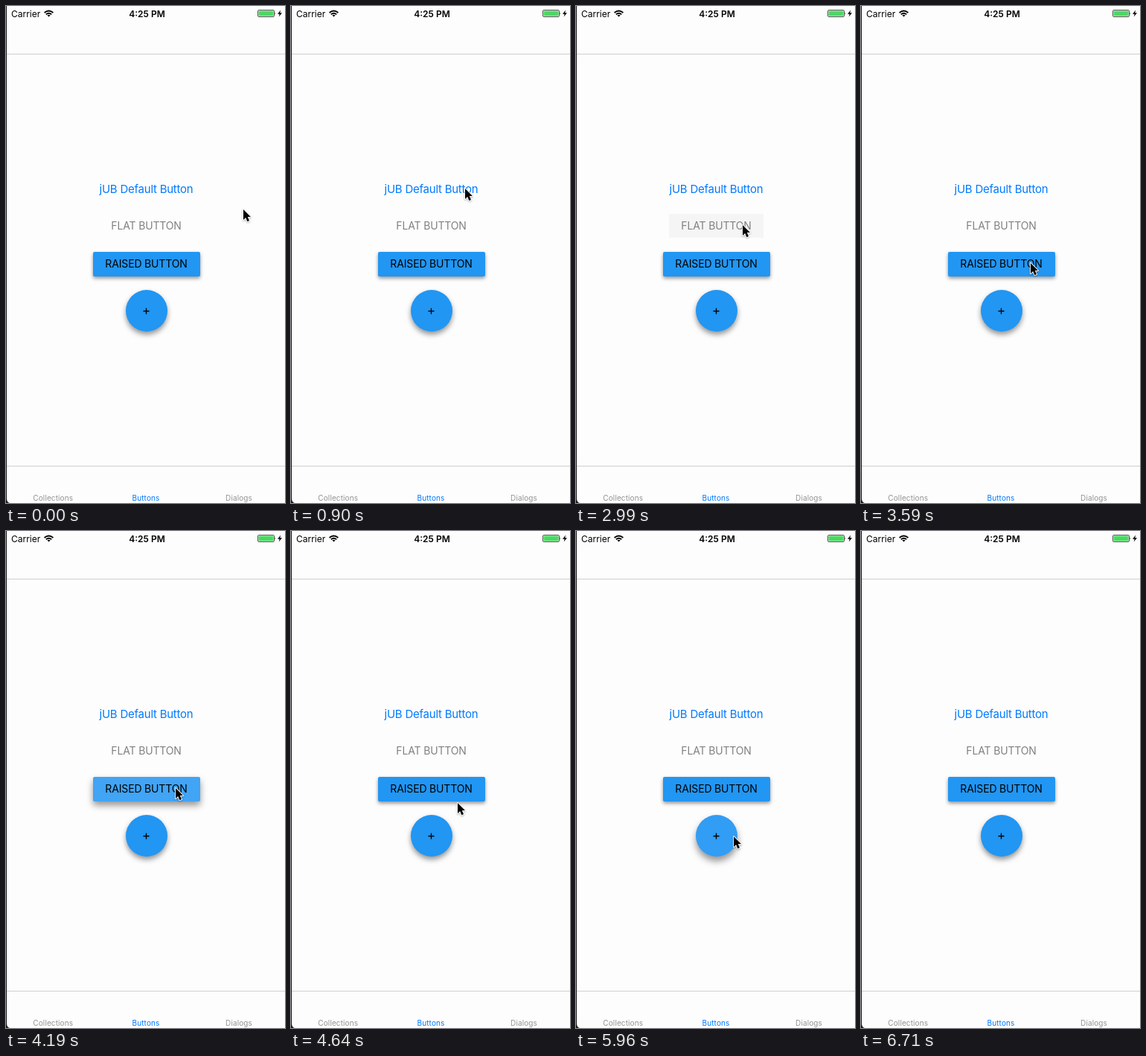
These frames come from a looping animation (375x667 px, 7.22 s). An HTML page:

```html
<!DOCTYPE html>
<html lang="en">
<head>
<meta charset="utf-8">
<title>Buttons</title>
<style>
  html, body { margin: 0; width: 100%; height: 100%; overflow: hidden; background: #fdfdfd; }
  .stage { position: relative; width: 375px; height: 667px; overflow: hidden; background: #fdfdfd; }
  .stage > * { position: absolute; }
  #flat { left: 125px; top: 279px; width: 127px; height: 32px; }
  #raised { left: 116.5px; top: 329.5px; width: 144px; height: 33px; border-radius: 2px; }
  #fab { left: 160.5px; top: 380.5px; width: 56px; height: 56px; border-radius: 50%; }
  svg { left: 0; top: 0; }
  text { font: 14px Inter, "Liberation Sans", sans-serif; text-anchor: middle; }
  .label { letter-spacing: -.16px; }
  .status { font-size: 12px; }
  .tab { font-size: 10px; letter-spacing: .1px; fill: #929292; }
  #plain { font-size: 15px; letter-spacing: -.24px; fill: #007aff; }
</style>
</head>
<body>
<div class="stage">
  <div id="flat"></div>
  <div id="raised"></div>
  <div id="fab"></div>
  <svg width="375" height="667" viewBox="0 0 375 667">
    <path d="M0 64.5H375M0 617.5H375" stroke="#cfcfcf"/>
    <path d="M0 0H1V661Q1 666 5 667H0Z" fill="#1c1c1c"/>

    <text class="status" x="7" y="14.5" style="text-anchor:start">Carrier</text>
    <g fill="none" stroke="#000" stroke-width="1.8">
      <path d="M51.6 9Q57.5 3.9 63.4 9M53.8 11.2Q57.5 8.2 61.2 11.2"/>
      <path d="M57.5 14.6L55.4 12.4Q57.5 10.9 59.6 12.4Z" fill="#000" stroke="none"/>
    </g>
    <text class="status" x="189.5" y="14.5" font-weight="600" style="font-weight:600">4:25 PM</text>
    <rect x="338.5" y="5.5" width="22" height="9" rx="1.5" fill="none" stroke="#555"/>
    <rect x="339.5" y="6.5" width="20" height="7" rx=".6" fill="#4cd964"/>
    <path d="M361.5 8.2Q363.2 10 361.5 11.8Z" fill="#333"/>
    <path d="M369.2 5.5L365 10.7H367.7L366.7 14.5L371 9.2H368.2Z"/>

    <text id="plain" x="188.5" y="251">jUB Default Button</text>
    <text class="label" x="188.5" y="300.2" fill="#808080">FLAT BUTTON</text>
    <text class="label" x="188.5" y="351.2">RAISED BUTTON</text>
    <path d="M184.5 409.5H192.5M188.5 405.5V413.5" stroke="#000" stroke-width="1.3"/>

    <text class="tab" x="63.2" y="663.6">Collections</text>
    <text class="tab" x="188" y="663.6" style="fill:#007aff">Buttons</text>
    <text class="tab" x="313" y="663.6">Dialogs</text>

    <g id="cursor" style="filter:drop-shadow(0 1px 1px rgba(0,0,0,.3))">
      <path d="M0 0V14L3.2 11.1L5.4 16.2L8 15.1L5.8 10.1H10Z" stroke="#fff" stroke-width="1.8" stroke-linejoin="round" paint-order="stroke"/>
    </g>
  </svg>
</div>
<script>
const LOOP = 7220;

// Each step is [ms, style]; a style holds until the next step.
function play(id, steps) {
  const frames = steps.map(([ms, style]) => ({ ...style, offset: ms / LOOP, easing: "steps(1, end)" }));
  frames.push({ ...steps[steps.length - 1][1], offset: 1 });
  document.getElementById(id).animate(frames, { duration: LOOP, iterations: Infinity });
}

const at = (x, y, opacity = 1) => ({ transform: `translate(${x}px, ${y}px)`, opacity });
const alpha = opacity => ({ opacity });
const fill = background => ({ background });
const lifted = (y, blur, backgroundColor = "#2196f3") =>
  ({ backgroundColor, boxShadow: `0 ${y}px ${blur}px rgba(0,0,0,.42)` });
const HALF = "#319df4", LIGHT = "#41a4f5";

play("cursor", [
  [0, at(319, 273)], [150, at(315, 272)],
  [450, at(300, 268)], [600, at(270, 257)], [750, at(244, 247)], [900, at(234, 245)],
  [1500, at(233, 247)], [1650, at(230, 262)], [1800, at(226, 282)], [1940, at(224, 293)], [2090, at(224, 294)],
  [3290, at(224, 303)], [3440, at(227, 330)], [3590, at(228, 345)],
  [4490, at(228, 346)], [4640, at(224, 365)], [4790, at(214, 392)], [4930, at(210, 405)], [5080, at(210, 407)],
  [5960, at(212, 410)], [6110, at(245, 480)], [6260, at(290, 560)], [6410, at(304, 582)], [6560, at(326, 621)],
  [6710, at(326, 621, 0)]
]);

play("plain", [
  [0, alpha(1)], [1050, alpha(.2)], [1500, alpha(.6)], [1650, alpha(.9)], [1800, alpha(1)]
]);

play("flat", [
  [0, fill("transparent")],
  [2690, fill("radial-gradient(circle at 99px 16px, #ececec, #f4f4f4 40px, #f5f5f5 68px, #f9f9f9 69px)")],
  [2990, fill("#f5f5f5")], [3290, fill("#f8f8f8")], [3440, fill("#fbfbfb")], [3590, fill("transparent")]
]);

play("raised", [
  [0, lifted(2.5, 5)], [3890, lifted(5, 10)], [4190, lifted(5, 10, LIGHT)],
  [4490, lifted(4, 8, HALF)], [4640, lifted(2.5, 5)]
]);

play("fab", [
  [0, lifted(4, 7)], [5370, lifted(6, 10)], [5520, lifted(8, 14, HALF)], [5670, lifted(8, 14, LIGHT)],
  [5960, lifted(6, 10, HALF)], [6110, lifted(4, 7)]
]);
</script>
</body>
</html>
```
